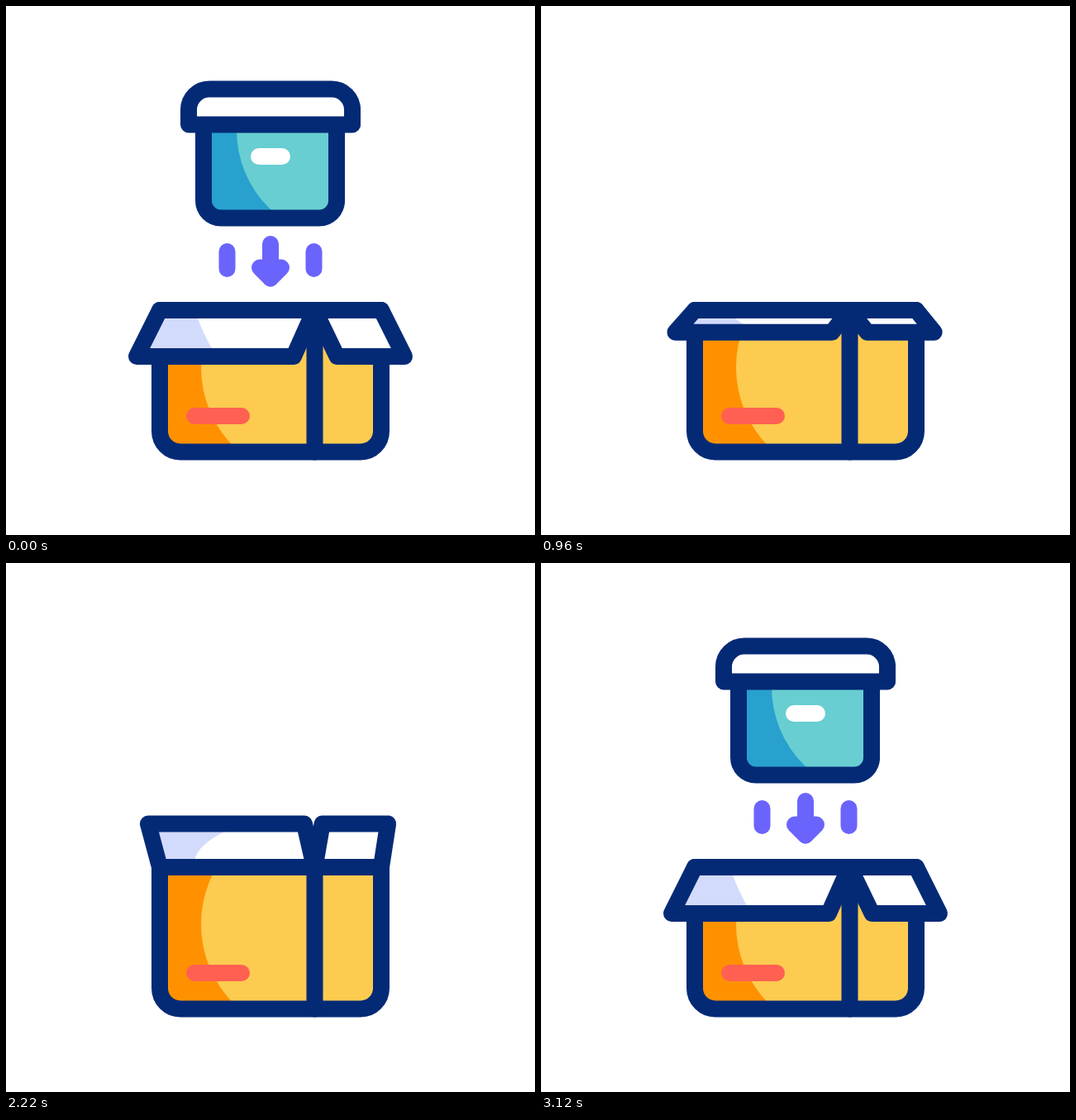
Write an HTML page with a canvas that moves like this. It is 640x640 px and loops after 3.16 s.

```html
<!DOCTYPE html>
<html lang="en">
<head>
<meta charset="utf-8">
<title>Packing a box</title>
<style>
html, body { margin: 0; width: 100%; height: 100%; overflow: hidden; background: #fff; }
canvas { display: block; width: 100vmin; height: 100vmin; }
</style>
</head>
<body>
<canvas id="stage" width="640" height="640"></canvas>
<script>
const ctx = document.getElementById('stage').getContext('2d');
const LOOP = 3160;
const NAVY = '#042a76', YELLOW = '#fdcb50', ORANGE = '#ff9100', RED = '#ff6052',
      TEAL = '#68ced2', BLUE = '#28a1ce', PURPLE = '#6b64fc', LAVENDER = '#d3dbfc';

const ease = {
  lin: p => p,
  in: p => p * p,
  out: p => p * (2 - p),
  both: p => p * p * (3 - 2 * p)
};
const mix = (a, b, p) => a + (b - a) * p;

// Each step is [time, value, easing towards this value].
function track(t, steps) {
  if (t <= steps[0][0]) return steps[0][1];
  for (let i = 1; i < steps.length; i++) {
    const [t1, v1, e] = steps[i], [t0, v0] = steps[i - 1];
    if (t <= t1) return mix(v0, v1, ease[e || 'both']((t - t0) / (t1 - t0)));
  }
  return steps[steps.length - 1][1];
}

const TURN = [[120, 0], [420, 1], [2620, 1], [2980, 0]];
const BIN_Y = [[120, 0], [330, -37], [640, 281, 'in'], [2413, 281], [2950, -55, 'out'], [3110, 0]];
const DIP = [[620, 0], [640, 4, 'in'], [700, 12, 'lin'], [770, 18, 'out'], [960, 0]];
const FLAP = [[880, 4.27], [1130, 1.5, 'both'], [1200, 0.54, 'lin'], [1250, 0, 'out'],
              [1880, 0], [2220, 2.12, 'in'], [2400, 3.95, 'lin'], [2460, 4.27, 'out']];
const STRETCH = [[120, 0], [440, 1]];
const SHOW = [[440, 1], [570, 0, 'in'], [2800, 0], [3080, 1, 'out']];

// Flap angle, then x offsets of the four free corners, then shade control and tip x.
const POSES = [
  [0, 0, 0, 0, 0, 246, 287],
  [0.54, -2, -6, -6, -8, 246, 287],
  [2.12, -14, -12, 9, 8, 221, 285],
  [4.27, -28, -25, 27, 28, 237, 255]
];

function jump(t) {
  const p = (t - 1440) / 258;
  return Math.abs(p) < 1 ? -156 * (1 - p * p) : 0;
}

function line(x0, y0, x1, y1, color, width = 20) {
  ctx.strokeStyle = color;
  ctx.lineWidth = width;
  ctx.beginPath();
  ctx.moveTo(x0, y0);
  ctx.lineTo(x1, y1);
  ctx.stroke();
}

function outline(path) {
  ctx.strokeStyle = NAVY;
  ctx.lineWidth = 20;
  ctx.stroke(path);
}

function poly(points) {
  const p = new Path2D();
  points.forEach(([x, y]) => p.lineTo(x, y));
  p.closePath();
  return p;
}

function panel(l, r, top, bottom, radius) {
  const p = new Path2D();
  p.roundRect(l, top, r - l, bottom - top, [0, 0, radius, radius]);
  return p;
}

// Fills a panel with a dark tone and a large light disc on top.
function shaded(path, dark, light, cx, cy, r) {
  ctx.save();
  ctx.clip(path);
  ctx.fillStyle = dark;
  ctx.fill(path);
  ctx.fillStyle = light;
  ctx.beginPath();
  ctx.arc(cx, cy, r, 0, 7);
  ctx.fill();
  ctx.restore();
}

function drawBin(y, k) {
  const m = (a, b) => mix(a, b, k);
  ctx.save();
  ctx.translate(0, y);
  const body = panel(m(239, 256), m(400, 425), 143, 256.5, 21);
  shaded(body, BLUE, TEAL, m(279, 303) + 133, 150, 133);
  line(306, 182, m(334, 326), 182, '#fff');
  outline(body);
  line(m(400, 385), 143, m(400, 385), m(236, 256), NAVY);

  const l = m(221, 247), w = m(198, 187.5);
  const lid = new Path2D();
  lid.roundRect(l, 100.5, w, 43, [25, m(25, 19), 0, 0]);
  ctx.fillStyle = '#fff';
  ctx.fill(lid);
  outline(lid);
  line(m(419, 390), m(124, 103), m(419, 390), 143, NAVY);
  ctx.restore();
}

function drawArrows(stretch, show) {
  if (show <= 0.01) return;
  const width = 20 * Math.min(1, show * 1.6), mid = 309;
  const at = (a, b) => mid + (mix(a, b, stretch) - mid) * show;
  for (const x of [267.5, 372.5]) line(x, at(297, 288), x, at(318, 330), PURPLE, width);
  const tip = at(329.5, 342);
  line(320, at(288, 278.5), 320, tip, PURPLE, width);
  const head = poly([[320 - 13 * show, tip - 13 * show], [320 + 13 * show, tip - 13 * show], [320, tip]]);
  ctx.fillStyle = PURPLE;
  ctx.fill(head);
  ctx.stroke(head);
}

function drawStreak(x, age) {
  const spot = a => 110 + 180 * Math.min(1, Math.max(0, a / 200));
  if (age < 0 || age > 260) return;
  line(x, spot(age - 60), x, spot(age), YELLOW);
}

function drawFlaps(angle) {
  if (angle < 0.01) return;
  const [ax, bx, cx, dx, bend, end] = POSES[0].slice(1).map((_, i) =>
    track(angle, POSES.map(p => [p[0], p[i + 1], 'lin'])));
  const h = -62 * Math.sin(angle), base = 368, tip = base + h;

  const left = poly([[186, base], [373, base], [373 + bx, tip], [186 + ax, tip]]);
  ctx.fillStyle = '#fff';
  ctx.fill(left);
  ctx.save();
  ctx.clip(left);
  ctx.fillStyle = LAVENDER;
  ctx.beginPath();
  ctx.moveTo(140, base);
  ctx.lineTo(229, base);
  ctx.quadraticCurveTo(bend, base + h / 2, end, tip);
  ctx.lineTo(140, tip);
  ctx.fill();
  ctx.restore();
  outline(left);

  const right = poly([[373.5, base], [454, base], [454 + dx, tip], [373.5 + cx, tip]]);
  ctx.fillStyle = '#fff';
  ctx.fill(right);
  outline(right);
}

function drawBox(y, angle) {
  ctx.save();
  ctx.translate(0, y);
  const body = panel(186, 454, 368, 539.5, 25);
  shaded(body, ORANGE, YELLOW, 373, 437, 137);
  line(228, 496, 285, 496, RED);
  outline(body);
  line(373.5, 368, 373.5, 539.5, NAVY);
  drawFlaps(angle);
  ctx.restore();
}

function draw(t) {
  ctx.fillStyle = '#fff';
  ctx.fillRect(0, 0, 640, 640);
  ctx.lineCap = ctx.lineJoin = 'round';
  const boxY = track(t, DIP) + jump(t);
  if (t < 660 || t > 2413) drawBin(track(t, BIN_Y), track(t, TURN));
  drawArrows(t < 2000 ? track(t, STRETCH) : 0, track(t, SHOW));
  drawStreak(343.8, t - 601);
  drawStreak(291.5, t - 699);
  drawBox(boxY, track(t, FLAP));
}

const start = performance.now();
function tick() {
  draw((performance.now() - start) % LOOP);
  requestAnimationFrame(tick);
}
tick();
</script>
</body>
</html>
```
